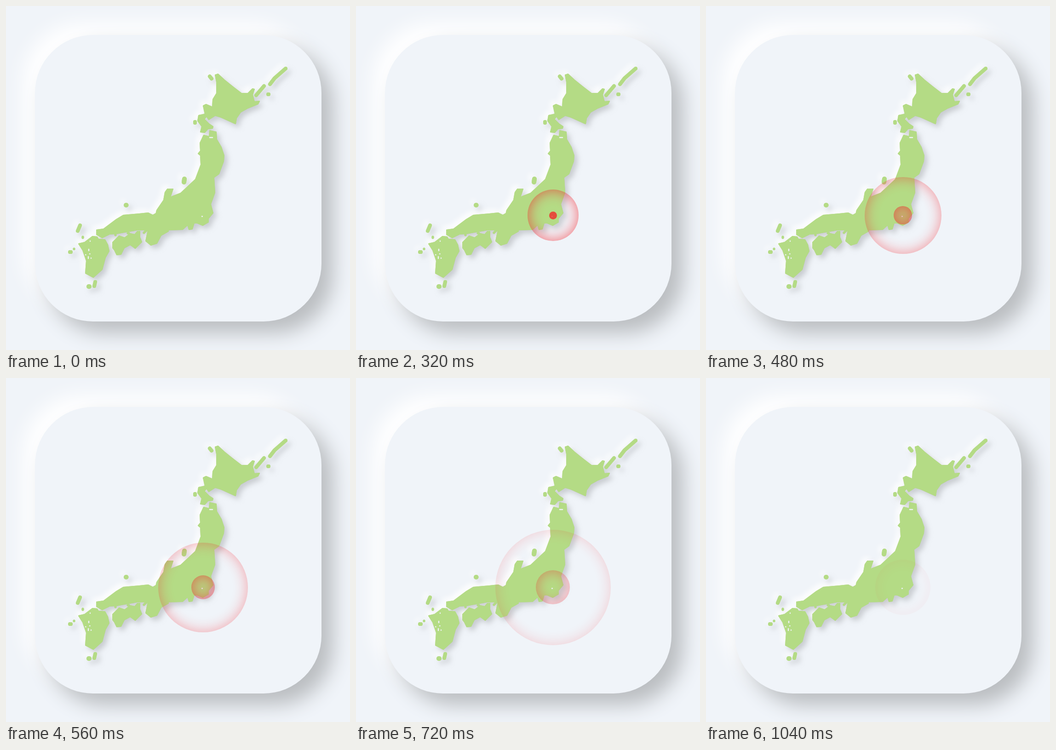
An HTML page for the animation above (1.12 s loop, 748 by 748 pixels).

```html
<!DOCTYPE html>
<html lang="en">
<head>
<meta charset="utf-8">
<title>Map with pulse</title>
<style>
  @property --t {
    syntax: "<number>";
    inherits: true;
    initial-value: 0;
  }
  html, body {
    margin: 0;
    width: 100%;
    height: 100%;
    overflow: hidden;
    background: #f0f4f9;
  }
  .card {
    position: absolute;
    left: 62.5px;
    top: 62.5px;
    width: 623px;
    height: 623px;
    border-radius: 126px;
    background: #f0f4f9;
    box-shadow: 25px 25px 44px #babdc0, -25px -25px 44px #fff;
  }
  .map {
    position: absolute;
    left: 0;
    top: 0;
  }
  .land {
    fill: #b4db85;
    stroke: #b4db85;
    stroke-width: 2;
    stroke-linejoin: round;
    stroke-linecap: round;
  }
  .islet {
    fill: none;
    stroke-width: 8;
  }
  .dot { stroke-width: 10; }
  .speck { stroke-width: 5; }
  .water {
    stroke: #edf1f4;
    stroke-width: 2.5;
    stroke-linecap: round;
  }

  /* --t is the loop time in ms, advancing in 80 ms ticks */
  .pulse {
    position: absolute;
    left: 428.3px;
    top: 455.2px;
    animation: clock 1120ms steps(14, end) infinite;
  }
  @keyframes clock {
    from { --t: 0; }
    to { --t: 1120; }
  }
  .ring {
    --age: max(0, var(--t) - var(--delay));
    --size: calc(var(--age) * var(--speed) * 1px);
    position: absolute;
    width: var(--size);
    height: var(--size);
    left: calc(var(--size) / -2);
    top: calc(var(--size) / -2);
    border-radius: 50%;
    box-shadow: inset 0 0 30px #f51c24;
    opacity: calc(1 - var(--age) / 890);
  }
  .wide { --delay: 0; --speed: 0.3485; }
  .small { --delay: 200; --speed: 0.143; }
</style>
</head>
<body>
<div class="card"></div>

<svg class="map" width="748" height="748" viewBox="0 0 748 748">
  <filter id="relief" x="0" y="0" width="748" height="748" filterUnits="userSpaceOnUse" color-interpolation-filters="sRGB">
    <feDropShadow in="SourceGraphic" dx="7" dy="7" stdDeviation="6" flood-color="#b4b7bc" flood-opacity=".65" result="dark"/>
    <feDropShadow in="SourceGraphic" dx="-7" dy="-7" stdDeviation="6" flood-color="#fff" flood-opacity=".85" result="light"/>
    <feMerge>
      <feMergeNode in="light"/>
      <feMergeNode in="dark"/>
    </feMerge>
  </filter>

  <g class="land" filter="url(#relief)">
    <!-- northern island -->
    <path d="M461 148 475 161 495 177 512 190 526 190 536 180 540 181 536 193 540 208 551 207 548 213 526 222 510 231 501 244 499 256 468 242 455 238 441 247 436 240 431 246 441 256 450 262 449 266 439 267 432 275 423 274 426 262 417 250 419 238 433 235 429 217 435 214 449 220 450 203 458 190 458 165 455 150Z"/>
    <!-- main island, north and east -->
    <path d="M443 271 457 274 458 290 468 307 474 325 473 338 463 365 452 373 454 406 445 431 450 450 440 462 440 470 428 477 416 472 409 472 405 485 398 486 395 476 384 486 348 487 322 470 328 444 343 422 346 405 351 398 363 398 357 416 380 407 412 377 424 345 423 325 418 321 423 315 422 298 430 281 442 284Z"/>
    <!-- main island, west -->
    <path d="M326 451 350 470 353 490 337 499 328 516 315 520 304 511 309 487 285 487 240 495 225 496 209 504 197 497 197 487 212 485 240 464 255 455 290 452 309 450 319 455Z"/>
    <!-- southern islands -->
    <path d="M232 514 246 500 258 504 270 495 280 497 286 490 291 490 291 503 295 513 281 527 270 519 257 526 250 540 241 541 236 531 232 526Z"/>
    <path d="M158 517 171 514 188 501 198 502 201 507 215 508 221 519 224 533 216 547 209 573 190 590 173 581 175 554 167 531Z"/>

    <path class="islet" d="M574 170 584 157 608 136M544 194 561 174M570 192h1M443 153 447 158M411 252v2M161 477 156 489M194 600 192 609M139 535h2"/>
    <path class="islet dot" d="M388 376 387 383M180 610h1M261 433h.5"/>
    <path class="islet speck" d="M167 502v2M148 528v.5M300 493 305 488M238 497v1M265 494h2"/>
  </g>

  <!-- bays and inlets -->
  <path class="water" d="M443 286h6M426 457.5h1M183 511v.5M180 529v3M182 539h.5M173 541h.5M179 545v4M185 548v.5"/>
</svg>

<div class="pulse">
  <div class="ring wide"></div>
  <div class="ring small"></div>
</div>
</body>
</html>
```
